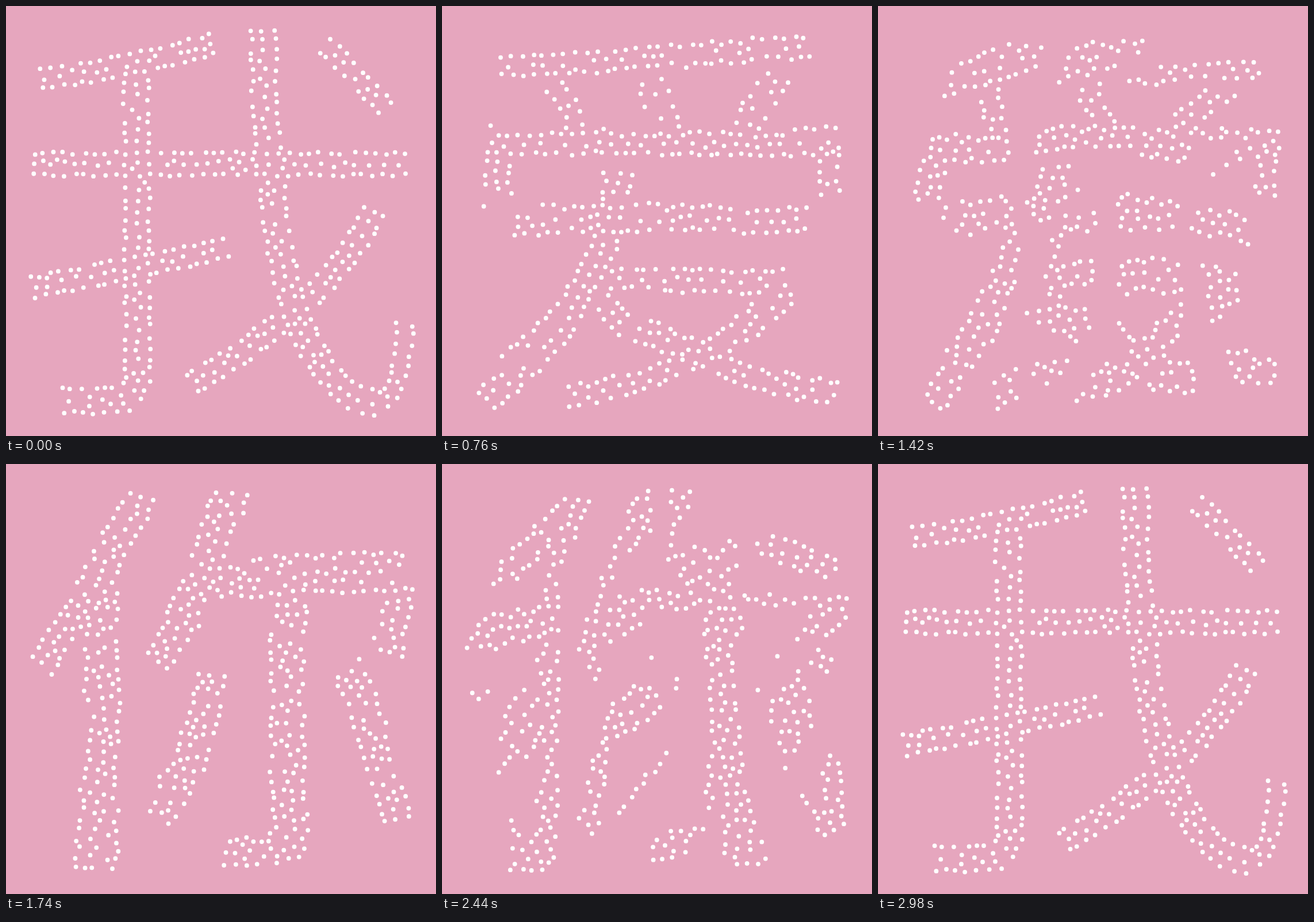
Animation, 748 px wide and 748 px high, one loop 3000 ms. Source, as an HTML page with a canvas:

```html
<!DOCTYPE html>
<html lang="zh">
<head>
<meta charset="utf-8">
<title>我爱你</title>
<style>
  html, body { margin: 0; width: 100%; height: 100%; overflow: hidden; background: #e6a6be; }
  canvas { display: block; }
</style>
</head>
<body>
<canvas id="stage" width="748" height="748"></canvas>
<script>
const SIZE = 748, COUNT = 530, RADIUS = 3.9, STEP = 18.5, GAP = 10, HOLD = 1000;

// Each stroke: centre line and half width.
const GLYPHS = [
  [ // 我
    ["M60 126Q190 113 360 66", 17],
    ["M227 128L229 640Q229 687 180 687L97 685", 21],
    ["M46 275H696", 19],
    ["M46 490Q200 460 385 420", 17],
    ["M447 42C450 250 468 420 505 540C555 660 605 692 640 689", 21],
    ["M655 684C688 670 688 610 695 552", 14],
    ["M640 357Q570 510 322 658", 18],
    ["M553 69Q610 118 659 178", 15]
  ],
  [ // 爱
    ["M108 102Q370 96 640 66", 16],
    ["M198 142Q224 165 232 212", 14],
    ["M373 136L395 214", 15],
    ["M582 124Q560 165 532 212", 17],
    ["M83 237H688", 17],
    ["M98 256L96 331", 18],
    ["M678 244L675 326", 14],
    ["M136 369H634", 17],
    ["M311 291C290 450 240 560 68 684", 19],
    ["M300 478H592", 17],
    ["M580 498Q450 650 224 680", 16],
    ["M286 515Q400 625 685 676", 17]
  ],
  [ // 你
    ["M231 52Q155 240 52 352", 19],
    ["M160 225L156 706", 23],
    ["M384 46Q345 220 260 337", 23],
    ["M350 205L700 195", 23],
    ["M690 212Q685 270 668 332", 19],
    ["M495 190V620Q496 684 455 684L390 682", 22],
    ["M362 368Q340 490 262 605", 22],
    ["M603 362Q650 470 688 605", 21]
  ]
];

function randomFrom(seed) {
  return () => {
    seed = (seed + 0x6d2b79f5) | 0;
    let t = Math.imul(seed ^ (seed >>> 15), 1 | seed);
    t = (t + Math.imul(t ^ (t >>> 7), 61 | t)) ^ t;
    return ((t ^ (t >>> 14)) >>> 0) / 4294967296;
  };
}

const dist2 = (a, b) => (a.x - b.x) ** 2 + (a.y - b.y) ** 2;
const clearance = (dots, p) => dots.reduce((min, o) => Math.min(min, dist2(o, p)), Infinity);

function makeStroke([d, half]) {
  const path = document.createElementNS("http://www.w3.org/2000/svg", "path");
  path.setAttribute("d", d);
  const length = path.getTotalLength();
  const at = (s, offset) => {
    s = Math.max(1, Math.min(length - 1, s));
    const a = path.getPointAtLength(s - 1), b = path.getPointAtLength(s + 1);
    const dx = b.x - a.x, dy = b.y - a.y, l = Math.hypot(dx, dy) || 1;
    return { x: (a.x + b.x) / 2 - dy / l * offset, y: (a.y + b.y) / 2 + dx / l * offset };
  };
  return { length, half, at };
}

// Dots along both edges first, then the inside is filled where it is emptiest.
function fillGlyph(list, seed) {
  const strokes = list.map(makeStroke), dots = [], rnd = randomFrom(seed);
  const wobble = r => (rnd() * 2 - 1) * r;

  for (const { length, half, at } of strokes) {
    const n = Math.round(length / STEP);
    for (const side of [-1, 1]) {
      for (let i = 0; i <= n; i++) {
        const dot = at(i * length / n + wobble(STEP * 0.3), side * half + wobble(2.5));
        if (clearance(dots, dot) > GAP * GAP) dots.push(dot);
      }
    }
  }

  const area = strokes.reduce((sum, s) => sum + s.length * s.half, 0);
  const inside = () => {
    let pick = rnd() * area;
    const s = strokes.find(s => (pick -= s.length * s.half) < 0) || strokes[0];
    return s.at(rnd() * s.length, wobble(s.half * 0.8));
  };
  while (dots.length < COUNT) {
    let best, room = -1;
    for (let i = 0; i < 30; i++) {
      const dot = inside(), free = clearance(dots, dot);
      if (free > room) { best = dot; room = free; }
    }
    dots.push(best);
  }
  return dots.slice(0, COUNT);
}

// Pair dots so that the summed squared travel is small.
function pair(from, to) {
  const rest = to.slice();
  const goal = from.map(a => {
    let best = 0;
    rest.forEach((b, i) => { if (dist2(a, b) < dist2(a, rest[best])) best = i; });
    return rest.splice(best, 1)[0];
  });
  for (let pass = 0, moved = true; moved && pass < 60; pass++) {
    moved = false;
    for (let i = 0; i < goal.length; i++) {
      for (let j = 0; j < i; j++) {
        const a = from[i], b = from[j], p = goal[i], q = goal[j];
        if ((a.x - b.x) * (p.x - q.x) + (a.y - b.y) * (p.y - q.y) < -1e-6) {
          goal[i] = q;
          goal[j] = p;
          moved = true;
        }
      }
    }
  }
  return from.map((a, i) => [a, goal[i]]);
}

const clouds = GLYPHS.map((g, i) => fillGlyph(g, 11 + i * 7));
const moves = clouds.map((c, i) => pair(c, clouds[(i + 1) % clouds.length]));
const ctx = document.getElementById("stage").getContext("2d");
const ease = t => (1 - Math.cos(Math.PI * t)) / 2;

function draw(time) {
  const t = time % (HOLD * moves.length);
  const k = ease(t % HOLD / HOLD);
  ctx.fillStyle = "#e6a6be";
  ctx.fillRect(0, 0, SIZE, SIZE);
  ctx.fillStyle = "#fff";
  ctx.beginPath();
  for (const [a, b] of moves[Math.floor(t / HOLD)]) {
    const x = a.x + (b.x - a.x) * k, y = a.y + (b.y - a.y) * k;
    ctx.moveTo(x + RADIUS, y);
    ctx.arc(x, y, RADIUS, 0, Math.PI * 2);
  }
  ctx.fill();
}

const start = performance.now();
function frame() {
  draw(performance.now() - start);
  requestAnimationFrame(frame);
}
frame();
</script>
</body>
</html>
```
